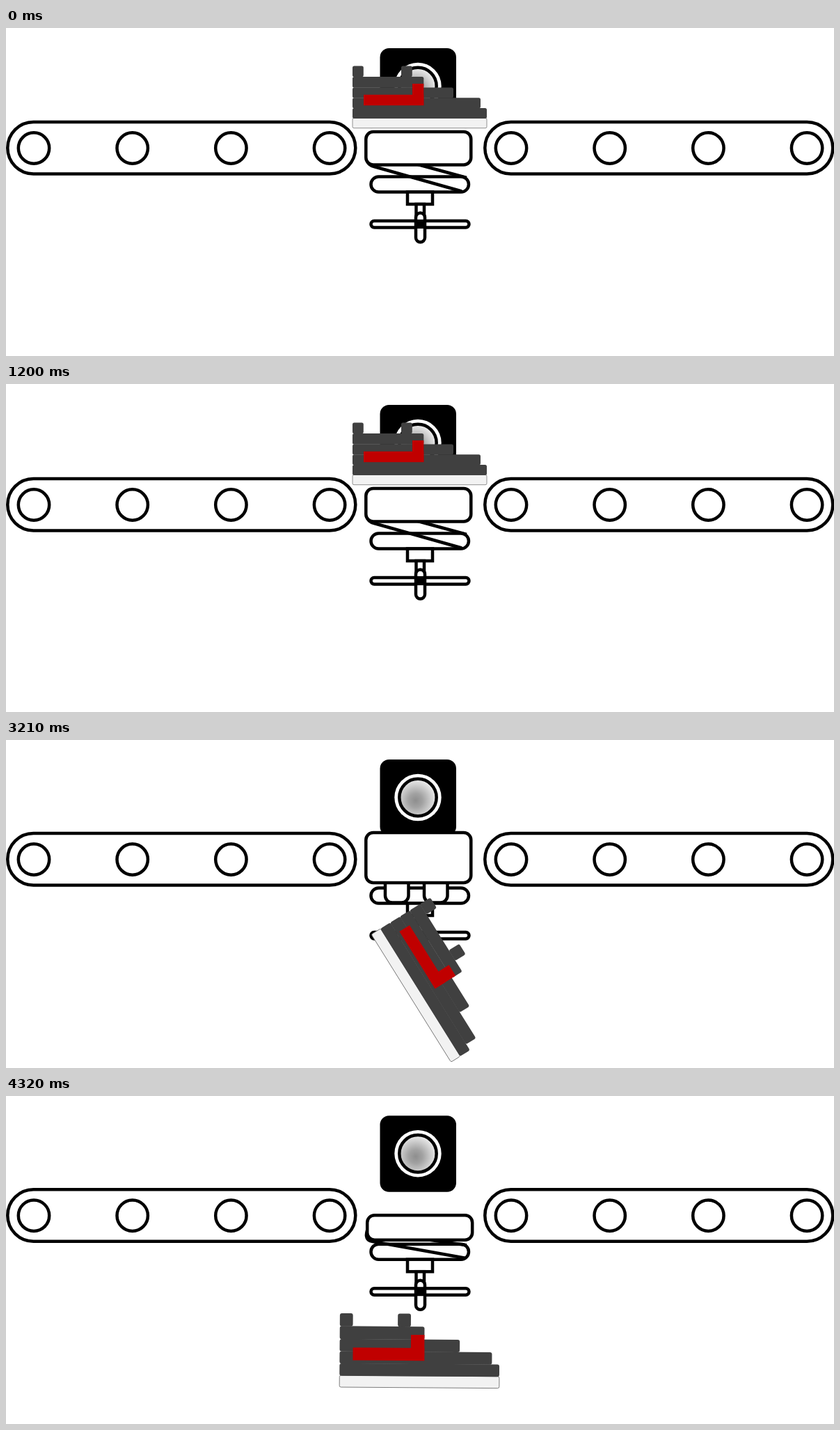
An HTML page for the animation above (4690 ms loop, 1190 px wide and 471 px high).

```html
<!DOCTYPE html>
<html lang="en">
<head>
<meta charset="utf-8">
<title>Conveyor inspection</title>
<style>
html, body { margin: 0; width: 100%; height: 100%; overflow: hidden; background: #fff; }
svg { display: block; width: 1190px; height: 471px; }
.line { fill: #fff; stroke: #000; stroke-width: 4.5; }
.open { fill: none; stroke: #000; stroke-width: 4.5; }
.brick { fill: #404040; }
.red { fill: #c00000; }
</style>
</head>
<body>
<svg viewBox="0 0 1190 471">
  <defs>
    <radialGradient id="glass" cx=".44" cy=".58" r=".62">
      <stop offset="0" stop-color="#8e8e8e"/>
      <stop offset=".3" stop-color="#a2a2a2"/>
      <stop offset="1" stop-color="#f6f6f6"/>
    </radialGradient>
    <radialGradient id="glow">
      <stop offset="0" stop-color="#fffbe0"/>
      <stop offset=".4" stop-color="#fff4b0" stop-opacity=".9"/>
      <stop offset="1" stop-color="#fff4b0" stop-opacity="0"/>
    </radialGradient>
    <g id="belt">
      <rect class="line" x="2.3" y="135" width="500" height="74.5" rx="37.2"/>
      <g id="rollers"></g>
    </g>
  </defs>
  <g id="stage">
    <use href="#belt"/>
    <use href="#belt" x="686"/>

    <rect x="537.5" y="29" width="109.5" height="109.5" rx="13"/>
    <circle cx="592" cy="83.5" r="33.7" fill="#fff"/>
    <circle cx="592" cy="83.5" r="26.7" fill="url(#glass)" stroke="#000" stroke-width="4.5"/>
    <circle id="flash" cx="592" cy="83.5" r="92" fill="url(#glow)"/>

    <rect class="line" x="524.5" y="213.5" width="140.5" height="22" rx="11"/>
    <rect class="line" x="577" y="235.5" width="36" height="17.5"/>
    <rect class="line" x="589.5" y="253" width="11.5" height="26"/>
    <rect class="line" x="524.5" y="277" width="141" height="9.5" rx="4.7"/>
    <rect class="line" x="589" y="265.5" width="13" height="42" rx="6.5"/>
    <rect x="588" y="275" width="15" height="13"/>

    <path id="strap" class="open"/>
    <rect id="legA" class="line" y="196" width="33.5" height="38.5" rx="10"/>
    <rect id="legB" class="line" y="196" width="33.5" height="38.5" rx="10"/>
    <rect id="table" class="line" width="151" rx="10.5"/>
    <g id="shoe"></g>
  </g>
</svg>
<script>
const $ = id => document.getElementById(id);
const add = (parent, tag, attrs) => {
  const el = document.createElementNS('http://www.w3.org/2000/svg', tag);
  set(el, attrs);
  parent.append(el);
};
const set = (el, attrs) => {
  for (const k in attrs) el.setAttribute(k, attrs[k]);
};

for (let i = 0; i < 4; i++)
  add($('rollers'), 'circle', { class: 'line', cx: 40 + i * 141.7, cy: 172.5, r: 22.2 });

// Shoe coordinates: origin at the heel end of the sole's underside
const block = (cls, x, y, width, height, rx) =>
  add($('shoe'), 'rect', { class: cls, x, y, width, height, rx });
add($('shoe'), 'rect', {
  x: 0, y: -14.5, width: 193, height: 14.2, rx: 2,
  fill: '#f2f2f2', stroke: '#777', 'stroke-width': .8
});
[[0, -29, 193], [0, -43.7, 184], [0, -58.4, 145], [0, -74, 102.3],
 [0, -89.5, 15.8], [70, -89.5, 15.8]]
  .forEach(([x, y, w]) => block('brick', x, y, w, y < -60 ? 15.8 : 15, 2.5));
block('red', 16, -48.2, 86.3, 15.4, 0);
block('red', 86, -64, 16.3, 31, 0);

const crossed = 'M519 190Q520 197 529 199L655 234.5M592 196L662 215';
const folded = 'M519 194Q515 208 526 209.5L660 233.5M606 207L662 215';

const rest = { shoe: [594.5, 144, 0, 1], table: [517.3, 149, 47.5], strap: crossed };
const flash = { ...rest, flash: 1 };
// shoe: x, y, angle, scale; table: x, y, height; legs: left x of each
const steps = [
  { ...rest, at: 0, dy: 0 },
  { ...flash, at: 300, dy: -1 },
  { ...rest, at: 600, dy: 0 },
  { ...flash, at: 900, dy: -1 },
  { ...rest, at: 1200, dy: 1 },
  { ...flash, at: 1500, dy: 0 },
  { ...rest, at: 1800, dy: 1 },
  { at: 2100, dy: 0, shoe: [601, 188, 22, 1], table: [517.3, 139, 65], legs: [523.5, 632.5] },
  { at: 2470, dy: 0, shoe: [604, 224.3, 40.2, 1], table: [517.3, 129, 77], legs: [523.5, 632.5] },
  { at: 2840, dy: -1, shoe: [599, 275, 45, 1.06], table: [517.3, 132, 74], legs: [535, 612], fill: 1 },
  { at: 3210, dy: -1, shoe: [582, 372, 58, 1.12], table: [517.3, 134, 72], legs: [545, 601], fill: 1 },
  { at: 3580, dy: -1, shoe: [560, 358, 42.6, 1.18], table: [517.3, 135, 71.5], legs: [555, 589.5], fill: 1 },
  { at: 3950, dy: -1, shoe: [580, 395, 20, 1.185], table: [518.5, 153, 54], strap: folded },
  { at: 4320, dy: -.8, shoe: [594, 420, .4, 1.19], table: [519.2, 172, 35.5], strap: folded }
];
const LOOP = 4690;

function show(s) {
  set($('stage'), { transform: `translate(0 ${s.dy})` });
  const [x, y, angle, scale] = s.shoe;
  set($('shoe'), { transform: `translate(${x} ${y}) rotate(${angle}) scale(${scale}) translate(-96.5 0)` });
  const [tx, ty, height] = s.table;
  set($('table'), { x: tx, y: ty, height });
  set($('strap'), { d: s.strap || '' });
  set($('flash'), { opacity: s.flash || 0 });
  ['legA', 'legB'].forEach((id, i) => set($(id), {
    x: s.legs ? s.legs[i] : 0,
    visibility: s.legs ? 'visible' : 'hidden',
    class: s.fill ? 'line' : 'open'
  }));
}

const start = performance.now();
let shown;
function tick() {
  const t = (performance.now() - start) % LOOP;
  const step = steps.findLast(s => s.at <= t);
  if (step !== shown) show(shown = step);
  requestAnimationFrame(tick);
}
tick();
</script>
</body>
</html>
```
